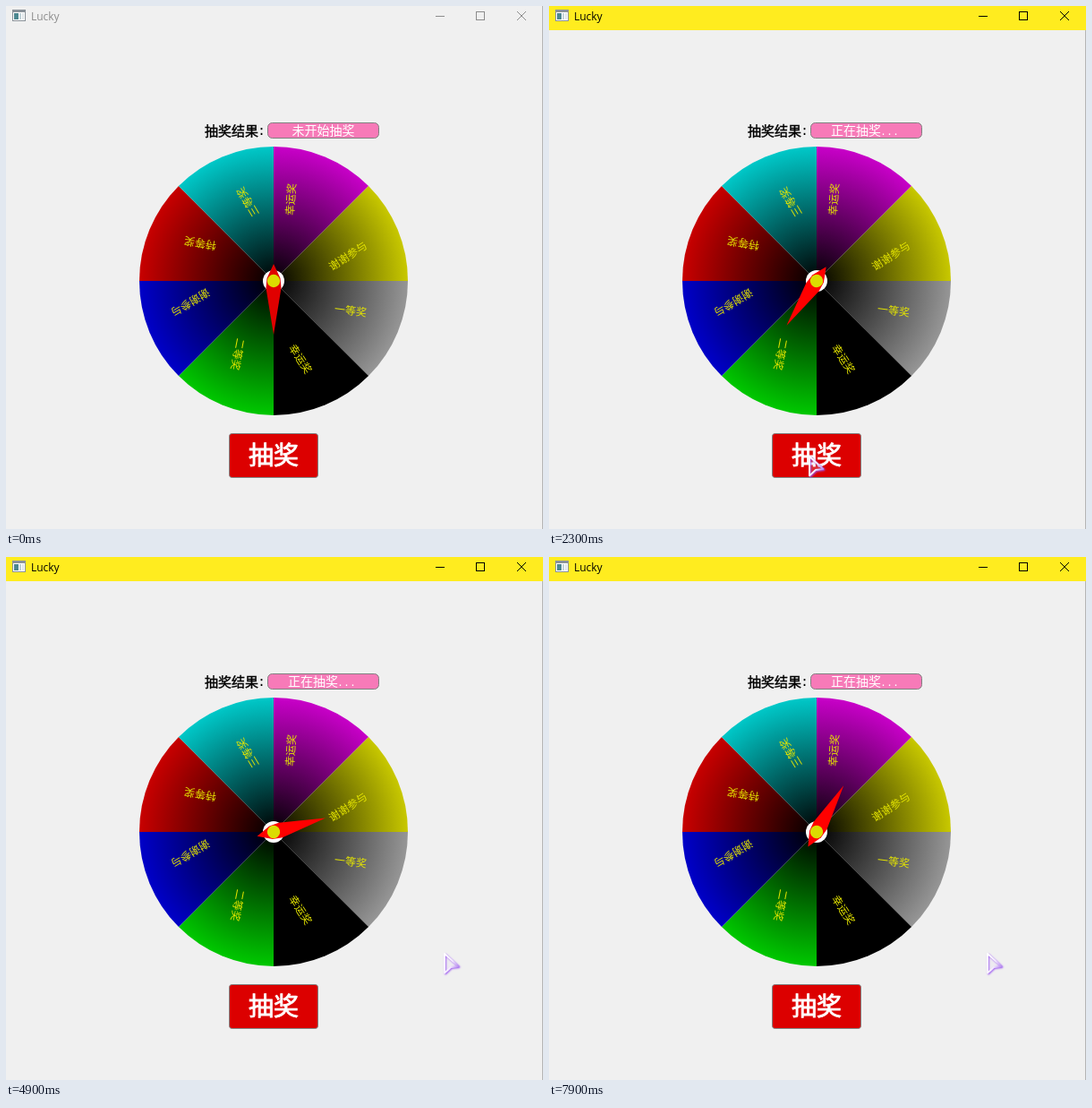
Recreate the animation shown at these times as an HTML page with a canvas. Size 600x584 px, loop 8 s.

```html
<!DOCTYPE html>
<html lang="zh">
<head>
<meta charset="utf-8">
<title>Lucky</title>
<style>
html, body { margin: 0; width: 100%; height: 100%; overflow: hidden; background: #f0f0f0; }
canvas { display: block; width: 600px; height: 584px; }
</style>
</head>
<body>
<canvas id="stage" width="600" height="584"></canvas>
<script>
const ctx = document.getElementById('stage').getContext('2d');
const LOOP = 8000, TICK = 100, CLICK = 1800;
const CX = 299, CY = 307, R = 150;
const CJK = '"Noto Sans CJK SC", "Noto Sans CJK", sans-serif';

// Slices run clockwise from twelve o'clock; labels are offset from the centre.
const slices = [
  { rgb: '200,0,200', text: '幸运奖', x: 19, y: -91, deg: -86 },
  { rgb: '200,200,0', text: '谢谢参与', x: 83, y: -28, deg: -33 },
  { rgb: '150,150,150', text: '一等奖', x: 86, y: 33, deg: 7 },
  { rgb: '0,0,0', text: '幸运奖', x: 30, y: 87, deg: 57 },
  { rgb: '0,200,0', text: '二等奖', x: -40, y: 82, deg: 101 },
  { rgb: '0,0,200', text: '谢谢参与', x: -93, y: 24, deg: 149 },
  { rgb: '200,0,0', text: '特等奖', x: -82, y: -42, deg: 190 },
  { rgb: '0,200,200', text: '三等奖', x: -29, y: -88, deg: 239 }
];

// Cursor way points: time, x, y
const path = [
  [600, 478, 168], [700, 427, 214], [800, 360, 268], [900, 312, 309],
  [1000, 312, 309], [1100, 301, 340], [1300, 293, 440], [1500, 290, 502],
  [2500, 290, 502], [2600, 297, 497], [3200, 489, 442], [8000, 489, 442]
];

function cursorAt(t) {
  if (t < path[0][0]) return null;
  const i = path.findIndex(p => p[0] > t);
  const [t0, x0, y0] = path[i - 1], [t1, x1, y1] = path[i];
  const k = (t - t0) / (t1 - t0);
  return [x0 + (x1 - x0) * k, y0 + (y1 - y0) * k];
}

// Clockwise degrees from straight down: start up, full speed, slow decay.
function needleAngle(t) {
  if (t < CLICK) return 0;
  if (t <= 2300) return 34 * ((t - 1700) / 600) ** 3;
  if (t <= 3500) return 34 + 621 * (t - 2300) / 1200;
  if (t <= 4000) {
    const u = (t - 3500) / 100;
    return 655 + u * (56.3 - 0.5 * u);
  }
  const u = (t - 4000) / 100;
  return 924 + u * (43.05 - 0.289 * (u - 19) - 0.00117 * (u - 19) * (u - 31));
}

function label(text, x, y, font, color, align = 'left', bold = 0) {
  ctx.font = font;
  ctx.fillStyle = color;
  ctx.textAlign = align;
  ctx.textBaseline = 'alphabetic';
  ctx.fillText(text, x, y);
  if (bold) {
    ctx.strokeStyle = color;
    ctx.lineWidth = bold;
    ctx.strokeText(text, x, y);
  }
}

function rect(x, y, w, h, color) {
  ctx.fillStyle = color;
  ctx.fillRect(x, y, w, h);
}

function polygon(points) {
  ctx.beginPath();
  for (const [x, y] of points) ctx.lineTo(x, y);
  ctx.closePath();
}

function disc(r, color) {
  ctx.beginPath();
  ctx.arc(0, 0, r, 0, Math.PI * 2);
  ctx.fillStyle = color;
  ctx.fill();
}

function panel(x, y, w, h, r, fill) {
  ctx.beginPath();
  ctx.roundRect(x + 0.5, y + 0.5, w - 1, h - 1, r);
  ctx.fillStyle = fill;
  ctx.fill();
  ctx.strokeStyle = '#808080';
  ctx.lineWidth = 1;
  ctx.stroke();
}

function drawTitle(active) {
  const ink = active ? '#000' : '#8c8c8c';
  rect(599, 0, 1, 584, '#b4b4b4');
  if (active) rect(0, 0, 600, 27, '#ffec1f');

  rect(7, 4, 15, 13, '#8a9299');
  rect(8, 7, 13, 9, '#fff');
  rect(9, 8, 5, 7, '#4c8790');
  rect(15, 8, 2, 7, '#c3d2d8');
  rect(18, 8, 2, 7, '#dfe5e8');

  label('Lucky', 28, 16, '12px "Open Sans", "Noto Sans", sans-serif', ink);
  rect(480, 11, 10, 1, ink);
  ctx.strokeStyle = ink;
  ctx.lineWidth = 1;
  ctx.strokeRect(525.5, 6.5, 9, 9);
  ctx.beginPath();
  ctx.moveTo(571, 6); ctx.lineTo(581, 16);
  ctx.moveTo(581, 6); ctx.lineTo(571, 16);
  ctx.stroke();
}

function drawResult(running) {
  label('抽奖结果', 222, 145, '15px ' + CJK, '#000', 'left', 0.4);
  label(':', 281, 144, '15px "Liberation Mono", monospace', '#000');
  panel(292, 130, 125, 18, 5, '#f77ab8');
  const font = '14px ' + CJK;
  if (running) {
    label('正在抽奖', 315, 144, font, '#fff');
    label('...', 370, 144, '11.7px "Liberation Mono", monospace', '#fff');
  } else {
    label('未开始抽奖', 354.5, 144, font, '#fff', 'center');
  }
}

function drawWheel() {
  ctx.save();
  ctx.translate(CX, CY);
  slices.forEach((s, i) => {
    const from = -Math.PI / 2 + i * Math.PI / 4;
    const fill = ctx.createRadialGradient(0, 0, 0, 0, 0, R);
    fill.addColorStop(0, '#000');
    fill.addColorStop(1, `rgb(${s.rgb})`);
    ctx.beginPath();
    ctx.moveTo(0, 0);
    ctx.arc(0, 0, R, from, from + Math.PI / 4);
    ctx.closePath();
    ctx.fillStyle = fill;
    ctx.fill();
  });
  for (const s of slices) {
    ctx.save();
    ctx.translate(s.x, s.y);
    ctx.rotate(s.deg * Math.PI / 180);
    label(s.text, 0, 4.5, '12px ' + CJK, '#e6e600', 'center');
    ctx.restore();
  }
  ctx.restore();
}

function drawNeedle(deg, active) {
  ctx.save();
  ctx.translate(CX, CY);
  disc(12, '#fff');
  ctx.rotate(deg * Math.PI / 180);
  polygon([[0, -19], [7.5, -3], [8.5, 8], [0, 60], [-8.5, 8], [-7.5, -3]]);
  ctx.fillStyle = active ? '#f00' : '#e00000';
  ctx.fill();
  disc(7.2, '#dcdc00');
  ctx.restore();
}

function drawButton() {
  panel(249, 477, 100, 50, 3, '#dc0000');
  label('抽奖', 299, 512, '28px ' + CJK, '#fff', 'center', 0.9);
}

function drawCursor(x, y) {
  ctx.save();
  ctx.translate(x, y);
  polygon([[1, 1], [16.5, 15], [8, 16], [1, 22.5]]);
  ctx.lineJoin = 'round';
  ctx.fillStyle = 'rgba(225,215,240,0.2)';
  ctx.fill();
  ctx.shadowColor = '#9a55f0';
  ctx.shadowBlur = 2;
  ctx.shadowOffsetX = 1;
  ctx.shadowOffsetY = 1;
  const edge = ctx.createLinearGradient(0, 10, 17, 16);
  edge.addColorStop(0, '#fff');
  edge.addColorStop(0.5, '#f4eaff');
  edge.addColorStop(1, '#b285ee');
  ctx.strokeStyle = edge;
  ctx.lineWidth = 1.8;
  ctx.stroke();
  ctx.restore();
}

function draw(t) {
  const active = t >= CLICK;
  rect(0, 0, 600, 584, '#f0f0f0');
  drawTitle(active);
  drawResult(active);
  drawWheel();
  drawNeedle(needleAngle(t), active);
  drawButton();
  const cursor = cursorAt(t);
  if (cursor) drawCursor(...cursor);
}

const start = performance.now();
function frame() {
  const t = (performance.now() - start) % LOOP;
  draw(Math.floor(t / TICK) * TICK);
  requestAnimationFrame(frame);
}
frame();
</script>
</body>
</html>
```
